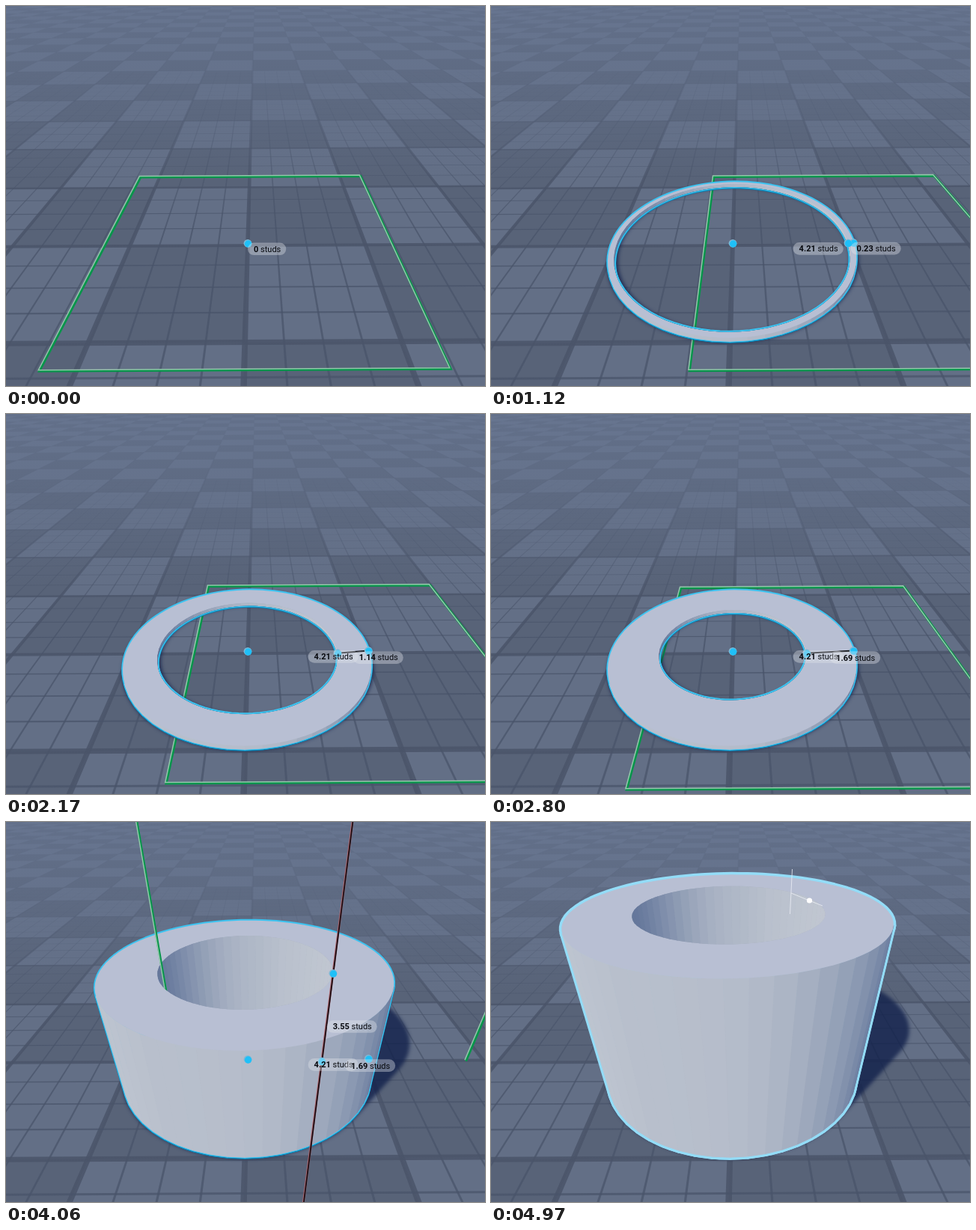
Write an HTML page with a canvas that moves like this. It is 640 px wide and 508 px high and loops after 5040 ms.

```html
<!DOCTYPE html>
<html lang="en">
<head>
<meta charset="utf-8">
<title>Tube drawing tool</title>
<style>
  html, body { margin: 0; width: 100%; height: 100%; overflow: hidden; background: #5f6b84; }
  canvas { display: block; width: 640px; height: 508px; }
</style>
</head>
<body>
<canvas id="stage" width="640" height="508"></canvas>
<script>
const W = 640, H = 508, LOOP = 5040, STEP = 70, TAU = Math.PI * 2;
const TILE = 4.08, SIDES = 56;
const CYAN = '#1fc0f8';

// [time, value] steps, linear in between
const RADIUS = [[70, 0], [210, .75], [350, 2.2], [490, 3.65], [560, 3.97], [630, 3.97], [840, 4.21]];
const WALL = [[980, .2], [1190, .25], [1540, .58], [1820, .82], [2170, 1.14], [2450, 1.48], [2660, 1.69]];
const HEIGHT = [[2870, 0], [3080, .28], [3430, 1.34], [4060, 3.55], [4480, 5.1], [4550, 5.19]];
const DRIFT = [[980, 0], [1540, -.06], [2170, -.14], [2800, -.3]];
const T_WALL = 980, T_HEIGHT = 2940, T_DONE = 4690;

function track(steps, t) {
  if (t <= steps[0][0]) return steps[0][1];
  for (let i = 1; i < steps.length; i++) {
    const [t0, a] = steps[i - 1], [t1, b] = steps[i];
    if (t <= t1) return a + (b - a) * (t - t0) / (t1 - t0);
  }
  return steps[steps.length - 1][1];
}

// Perspective in studs: x right, y up, z away from the viewer
function project(x, y, z) {
  const g = -.0445 * y, q = z / 16.5, w = 1 + g + q;
  return [(323 + 38.3 * x + 339 * g + 334 * q) / w, (317.3 - .2 * x + 962 * g - 70 * q) / w];
}

function layer() {
  const c = document.createElement('canvas');
  c.width = W;
  c.height = H;
  return c.getContext('2d');
}

function poly(pts, closed = true) {
  const path = new Path2D();
  pts.forEach(([x, y], i) => i ? path.lineTo(x, y) : path.moveTo(x, y));
  if (closed) path.closePath();
  return path;
}

function circle(r, y, cx = 0, cz = 0) {
  const pts = [];
  for (let i = 0; i < 96; i++) {
    const a = i / 96 * TAU;
    pts.push(project(cx + r * Math.cos(a), y, cz + r * Math.sin(a)));
  }
  return poly(pts);
}

function floorRect(x0, z0, x1, z1) {
  return poly([project(x0, 0, z0), project(x1, 0, z0), project(x1, 0, z1), project(x0, 0, z1)]);
}

function fade(c, y0, y1, rgb, a0, a1) {
  const g = c.createLinearGradient(0, y0, 0, y1);
  g.addColorStop(0, `rgba(${rgb},${a0})`);
  g.addColorStop(1, `rgba(${rgb},${a1})`);
  return g;
}

function drawFloor(c) {
  const z0 = -.12, near = -6.8, far = 90, u = TILE / 4;
  c.fillStyle = '#586378';
  c.fillRect(0, 0, W, H);
  c.fillStyle = '#636f86';
  for (let row = -2; row < 22; row++) {
    for (let col = -15; col < 15; col++) {
      if ((row + col) & 1) {
        const x = col * TILE, z = z0 + row * TILE;
        c.fill(floorRect(x, Math.max(z, near), x + TILE, z + TILE));
      }
    }
  }
  const majorInk = fade(c, 20, 260, '74,84,105', .1, .85);
  const minorInk = fade(c, 50, 300, '72,83,105', .1, .72);
  for (let i = -60; i <= 60; i++) {
    const major = i % 4 === 0, half = major ? .075 : .028;
    c.fillStyle = major ? majorInk : minorInk;
    c.fill(floorRect(i * u - half, near, i * u + half, major ? far : 24));
  }
  for (let i = -6; i <= 84; i++) {
    const major = i % 4 === 0, half = major ? .085 : .03, z = z0 + i * u;
    if (!major && z > 24) continue;
    c.fillStyle = major ? majorInk : minorInk;
    c.fill(floorRect(-62, z - half, 62, z + half));
  }
  c.fillStyle = fade(c, 0, 230, '105,120,149', .62, 0);
  c.fillRect(0, 0, W, H);
}

const ctx = document.getElementById('stage').getContext('2d');
const ground = layer(), under = layer(), shade = layer();
drawFloor(ground);

function greenLine(c, pts, closed) {
  const shifted = (dx, dy) => poly(pts.map(([x, y]) => [x + dx, y + dy]), closed);
  c.lineJoin = 'miter';
  c.strokeStyle = '#08954b';
  c.lineWidth = 3.2;
  c.stroke(shifted(1.2, .9));
  c.strokeStyle = '#94c6ab';
  c.lineWidth = 1.5;
  c.stroke(shifted(-.2, -.5));
}

function drawShadow(c, R, r, h) {
  shade.clearRect(0, 0, W, H);
  shade.fillStyle = '#12214c';
  const n = 24;
  for (let i = 0; i <= n; i++) {
    const k = h * i / n, ring = circle(R, 0, .53 * k, .6 * k);
    ring.addPath(circle(r, 0, .53 * k, .6 * k));
    shade.fill(ring, 'evenodd');
  }
  c.save();
  c.globalAlpha = .8;
  c.filter = 'blur(2.5px)';
  c.drawImage(shade.canvas, 0, 0);
  c.restore();
}

// Wall colour from the sideways part of its normal
function wallColor(nx, i) {
  const d = Math.max(0, nx);
  const t = .84 - .14 * nx - .62 * d * d + .035 * Math.sin(i * 12.9) * (nx > -.5);
  const mix = (a, b) => Math.round(a + (b - a) * t);
  return `rgb(${mix(92, 194)},${mix(112, 200)},${mix(150, 210)})`;
}

function wallQuads(r, h, inward) {
  const quads = [];
  for (let i = 0; i < SIDES; i++) {
    const a = i / SIDES * TAU, b = (i + 1) / SIDES * TAU, m = (a + b) / 2;
    const at = (v, y) => project(r * Math.cos(v), y, r * Math.sin(v));
    const pts = [at(a, 0), at(b, 0), at(b, h), at(a, h)];
    const [p, q, s] = pts;
    const front = (q[0] - p[0]) * (s[1] - p[1]) - (q[1] - p[1]) * (s[0] - p[0]) < 0;
    if (front !== inward) {
      quads.push({ path: poly(pts), color: wallColor(Math.cos(m) * (inward ? -1 : 1), i) });
    }
  }
  return quads;
}

function fillQuads(quads) {
  ctx.lineWidth = .8;
  for (const { path, color } of quads) {
    ctx.fillStyle = ctx.strokeStyle = color;
    ctx.fill(path);
    ctx.stroke(path);
  }
}

// Bright outline above a darker one
function outline(paths, done) {
  const pass = (color, width, dy) => {
    ctx.save();
    ctx.translate(0, dy);
    ctx.strokeStyle = color;
    ctx.lineWidth = width;
    paths.forEach(p => ctx.stroke(p));
    ctx.restore();
  };
  ctx.lineJoin = 'round';
  if (done) return pass('#93dcf7', 7, 0);
  pass('#0a86b8', 3.6, .6);
  pass('#3cc3f0', 3.2, -.4);
}

function drawTube(R, r, h, done) {
  const top = circle(R, h), base = circle(R, 0), holeTop = circle(r, h), holeBase = circle(r, 0);
  const outer = wallQuads(R, h, false);

  outline([top, base, ...outer.map(q => q.path)], done);
  ctx.fillStyle = '#b9bfd1';
  ctx.fill(base);
  fillQuads(outer);
  ctx.fillStyle = '#b8bfd3';
  ctx.fill(top);

  ctx.save();
  ctx.clip(holeTop);
  ctx.fillStyle = '#a5aec0';
  ctx.fillRect(0, 0, W, H);
  fillQuads(wallQuads(r, h, true));
  ctx.clip(holeBase);
  ctx.drawImage(under.canvas, 0, 0);
  outline([holeBase, holeTop], done);
  ctx.restore();
  return holeTop;
}

function disc(x, y, r, color) {
  ctx.fillStyle = color;
  ctx.beginPath();
  ctx.arc(x, y, r, 0, TAU);
  ctx.fill();
}

function handle([x, y]) {
  disc(x, y, 5.4, '#7fb9d6');
  disc(x + .6, y + .7, 4.7, CYAN);
}

function blackLine(a, b) {
  ctx.strokeStyle = '#05070d';
  ctx.lineWidth = 2;
  ctx.stroke(poly([a, b], false));
}

function label(value, a, b) {
  const [x, y] = project(...a.map((v, i) => (v + b[i]) / 2));
  const num = value ? value.toFixed(2) : '0';
  const bold = '700 11px Roboto, sans-serif', plain = '11px Roboto, sans-serif';
  ctx.font = bold;
  const w1 = ctx.measureText(num).width;
  ctx.font = plain;
  const w2 = ctx.measureText(' studs').width;
  ctx.fillStyle = 'rgba(225,228,235,.38)';
  ctx.beginPath();
  ctx.roundRect(x, y - .8, w1 + w2 + 15, 16.6, 8.3);
  ctx.fill();
  ctx.fillStyle = '#07090e';
  ctx.fillText(' studs', x + 8 + w1, y + 11.4);
  ctx.font = bold;
  ctx.fillText(num, x + 8, y + 11.4);
}

function verticalGuide(x, z, y, h, hole) {
  const left = x - 5.03, right = x + 5.05, top = y + 5.35;
  const low = project(left, h, 0), corner = project(left, top, 0);
  greenLine(ctx, [low, corner, project(right, top, 0), project(right, -.1, 0)], false);
  ctx.save();
  ctx.clip(hole);
  greenLine(ctx, [project(left, 0, 0), low], false);
  ctx.restore();

  const a = project(x, -10, z), b = project(x, 8.5, z);
  ctx.strokeStyle = '#a9646c';
  ctx.lineWidth = 3;
  ctx.stroke(poly([a, b], false));
  ctx.strokeStyle = '#160a10';
  ctx.lineWidth = 1.7;
  ctx.stroke(poly([[a[0] + .4, a[1]], [b[0] + .4, b[1]]], false));
}

function hoverMark() {
  ctx.lineWidth = 1;
  ctx.strokeStyle = 'rgba(235,238,245,.8)';
  ctx.stroke(poly([[402.5, 63], [399.5, 123]], false));
  ctx.stroke(poly([[401, 95], [425, 105], [443, 112]], false));
  disc(425.5, 105, 3.6, '#fff');
}

function draw(t) {
  const R = track(RADIUS, t), count = track(HEIGHT, t), drift = track(DRIFT, t);
  const walling = t >= T_WALL, rising = t >= T_HEIGHT, done = t >= T_DONE;
  const wall = walling ? track(WALL, t) : Math.min(.4, R * .6);
  const r = R - wall, h = Math.max(.15, count * 1.027);
  const cx = walling ? r + .04 : R;

  under.drawImage(ground.canvas, 0, 0);
  if (!rising) {
    greenLine(under, [[-5, 5], [5, 5], [5, -5], [-5, -5]].map(
      ([x, z]) => project(cx + x, 0, drift + z)), true);
  }
  if (R) drawShadow(under, R, r, h);
  ctx.drawImage(under.canvas, 0, 0);

  const hole = R ? drawTube(R * .99, r, h, done) : null;
  if (done) return hoverMark();

  const z = Math.max(drift, -.13);
  const origin = [0, 0, 0], rim = [R, 0, 0], inner = [cx, 0, z];
  const lift = [cx, Math.max(0, count - .1), z];

  if (rising) verticalGuide(cx, z, lift[1], h, hole);
  else if (walling) blackLine(project(...inner), project(...rim));
  else if (R) blackLine(project(...origin), project(...rim));

  handle(project(...origin));
  if (R) handle(project(...rim));
  if (walling) handle(project(...inner));
  if (rising) handle(project(...lift));

  label(R, origin, rim);
  if (walling) label(wall, inner, rim);
  if (rising) label(count, inner, lift);
}

let shown = -1;
function tick(now) {
  const t = Math.floor(now % LOOP / STEP) * STEP;
  if (t !== shown) draw(shown = t);
  requestAnimationFrame(tick);
}
draw(0);
requestAnimationFrame(tick);
</script>
</body>
</html>
```
